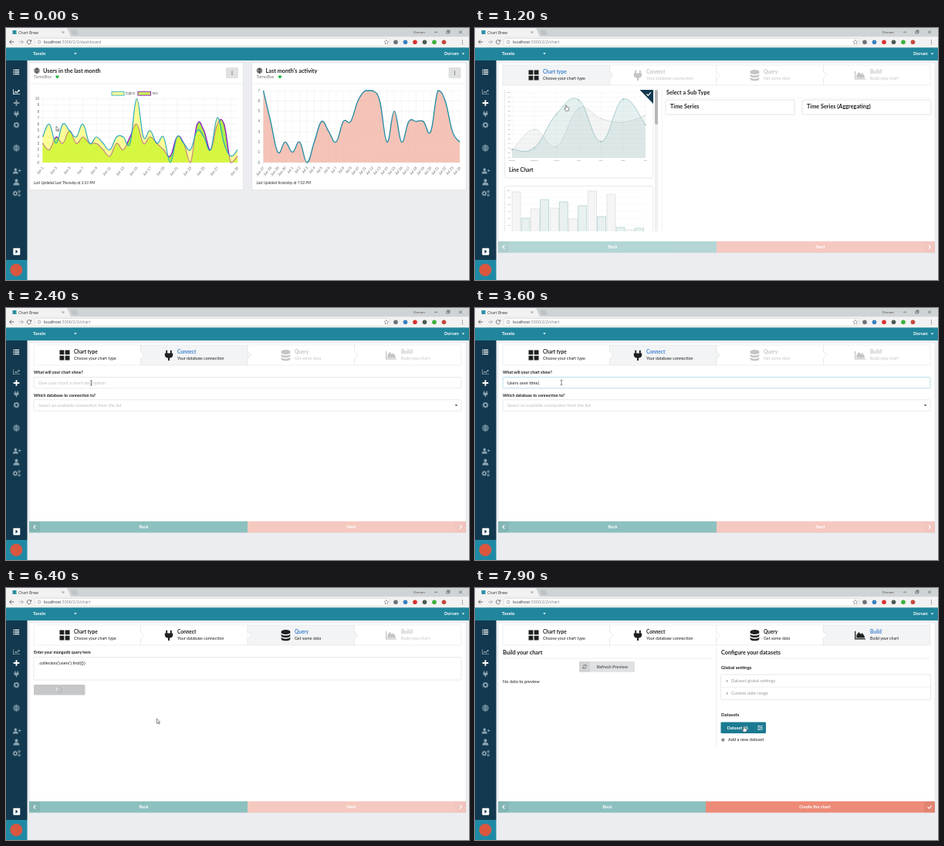
An HTML page that plays this animation: 600 by 326 pixels, repeating every 8000 ms.

```html
<!DOCTYPE html>
<html lang="en">
<head>
<meta charset="utf-8">
<title>Chart Brew</title>
<style>
html, body { margin: 0; width: 100%; height: 100%; overflow: hidden; background: #ebedf0; }
svg { display: block; width: 600px; height: 326px; font-family: Lato, sans-serif; }
</style>
</head>
<body>
<svg id="stage" viewBox="0 0 600 326"></svg>
<script>
const LOOP = 8000, TEAL = '#21869d', NAVY = '#12394f', INK = '#1f2021', SALMON = '#ed8b78';
const USER = 'Dorvan', TEAM = 'Tavelo', SOURCE = 'TarnoBox';

// Drawing helpers
const text = (x, y, size, str, fill = INK, extra = '') =>
  `<text x="${x}" y="${y}" font-size="${size}" fill="${fill}" ${extra}>${str}</text>`;
const bold = (x, y, size, str, fill, extra = '') => text(x, y, size, str, fill, 'font-weight="700" ' + extra);
const MID = 'text-anchor="middle"', END = 'text-anchor="end"';
const rect = (x, y, w, h, fill, extra = '') =>
  `<rect x="${x}" y="${y}" width="${w}" height="${h}" fill="${fill}" ${extra}/>`;
const dot = (x, y, r, fill) => `<circle cx="${x}" cy="${y}" r="${r}" fill="${fill}"/>`;
const fillPath = (d, fill, extra = '') => `<path d="${d}" fill="${fill}" ${extra}/>`;
const line = (d, stroke, width = .5) => `<path d="${d}" fill="none" stroke="${stroke}" stroke-width="${width}"/>`;
const box = (x, y, w, h, stroke = '#d9dadb', fill = '#fff') =>
  rect(x, y, w, h, fill, `rx="1.3" stroke="${stroke}" stroke-width=".6"`);
const range = n => [...Array(n).keys()];
const caret = (x, y, fill) => fillPath(`M${x - 1.8} ${y - 1}h3.6l-1.8 2z`, fill);

// Icons live in a box from -5 to 5
const gearPath = 'M' + range(32).map(i => {
  const a = i * Math.PI / 16, r = i % 4 < 2 ? 5 : 3.7;
  return `${(r * Math.cos(a)).toFixed(2)} ${(r * Math.sin(a)).toFixed(2)}`;
}).join('L') + 'zM-1.8 0a1.8 1.8 0 1 0 3.6 0a1.8 1.8 0 1 0-3.6 0z';
const AXES = 'M-6-4.5h1.1V3.6H6V4.7H-6z';
const icons = {
  grid: 'M-5-5h4.5v4.5h-4.5zM.5-5h4.5v4.5H.5zM-5 .5h4.5V5h-4.5zM.5 .5H5V5H.5z',
  plug: 'M-3-5h1.5v3h-1.5zM1.5-5h1.5v3h-1.5zM-4.2-2h8.4v1.5A4.2 3.6 0 0 1 .8 3V5.5H-.8V3A4.2 3.6 0 0 1-4.2-.5z',
  data: 'M-4.5-3.7A4.5 1.6 0 0 1 4.5-3.7V-2.4A4.5 1.6 0 0 1-4.5-2.4zM-4.5-1.2A4.5 1.6 0 0 0 4.5-1.2V.8A4.5 1.6 0 0 1-4.5 .8zM-4.5 2A4.5 1.6 0 0 0 4.5 2V4A4.5 1.6 0 0 1-4.5 4z',
  area: AXES + 'M-4 3V0L-1.5-3.5 .8-1 2.5-2.5 5 1V3z',
  line: AXES + 'M-4 1.5L-1.2-1.5 1 .5 3.3-2.2 2.3-3.2H5.5V0L4.4-1 1 2.7-1.2 .6-3.2 2.6z',
  plus: 'M-1.1-4.5H1.1V-1.1H4.5V1.1H1.1V4.5H-1.1V1.1H-4.5V-1.1H-1.1z',
  list: [-4, -.8, 2.4].map(y => `M-5 ${y}h1.6v1.6h-1.6zM-2.6 ${y}H5v1.6h-7.6z`).join(''),
  user: 'M-2.4-2.4a2.4 2.6 0 1 1 4.8 0a2.4 2.6 0 1 1-4.8 0zM-4.5 4.6V3A3 2.6 0 0 1-1.5 .7H1.5A3 2.6 0 0 1 4.5 3V4.6z',
  flask: 'M-1.5-4.5H1.5V-1L4 4.5H-4L-1.5-1z',
  gear: gearPath
};
const icon = (name, x, y, s, fill) =>
  fillPath(icons[name], fill, `fill-rule="evenodd" transform="translate(${x} ${y}) scale(${s})"`);
const globe = (x, y, r, c) => `<g transform="translate(${x} ${y}) scale(${r / 4})">` +
  line('M-4 0a4 4 0 1 0 8 0a4 4 0 1 0-8 0M0-4V4M-4 0H4M0-4Q-3.6 0 0 4Q3.6 0 0-4M-3.4-2H3.4M-3.4 2H3.4', c, .75) + '</g>';
const refresh = (x, y, c) => line(`M${x - 2} ${y - .6}a2.1 2.1 0 0 1 3.8-.6m.3-1.4v1.6h-1.6M${x + 2} ${y + .6}a2.1 2.1 0 0 1-3.8 .6m-.3 1.4v-1.6h1.6`, c, .7);

// Smooth curve through points, kept between two heights
function curve(pts, top, bottom) {
  const clamp = y => Math.max(top, Math.min(bottom, y));
  const slope = i => {
    const a = pts[Math.max(i - 1, 0)], b = pts[Math.min(i + 1, pts.length - 1)];
    return [(b[0] - a[0]) * .2, (b[1] - a[1]) * .2];
  };
  return 'M' + pts[0] + pts.slice(1).map((p, i) => {
    const q = pts[i], s = slope(i), e = slope(i + 1);
    return `C${q[0] + s[0]} ${clamp(q[1] + s[1])} ${p[0] - e[0]} ${clamp(p[1] - e[1])} ${p}`;
  }).join('');
}
const under = (pts, top, bottom) => curve(pts, top, bottom) + `V${bottom}H${pts[0][0]}z`;

// Browser window
function browser() {
  let s = rect(0, 0, 600, 12, '#d0d3d5') + fillPath('M0 0H79L84 11.5H0z', '#f2f2f2') +
    fillPath('M83.5 2.5h8l2.5 6.5h-8z', '#bfc3c5') + rect(0, 11.3, 600, 14, '#f2f2f2') +
    rect(8.5, 3, 5, 5, '#2a8fa3') + text(16, 7.8, 5, 'Chart Brew', '#333', 'font-family="Open Sans, sans-serif"') +
    line('M72.5 4l3 3m0-3l-3 3', '#555') + text(528, 7, 4.6, USER, '#555') +
    line('M555 5.3h4M571 4h3v3h-3zm1 0v-1h3v3h-1M587 3.3l4 4m0-4l-4 4', '#222') +
    line('M10 18H4.6m2.4-2.5L4.5 18l2.5 2.5', '#555', .9) + line('M17 18h5.4m-2.4-2.5l2.5 2.5-2.5 2.5', '#aaa', .9) +
    line('M32.3 17a2.6 2.6 0 1 0 0 2.2m.3-3.8v1.9h-1.9', '#555', .8) +
    rect(37.5, 13.4, 460, 9.8, '#fff', 'rx="1.2" stroke="#c4c4c4" stroke-width=".5"') +
    line('M40.9 18.2a2.1 2.1 0 1 0 4.2 0a2.1 2.1 0 1 0-4.2 0M43 17.8v1.6M43 16.8v.5', '#777', .5) +
    text(49, 20.3, 5.3, 'localhost<tspan id="path" fill="#777"></tspan>', '#222', 'font-family="Open Sans, sans-serif"') +
    fillPath('M493 15l.9 2.2 2.3.1-1.8 1.5.6 2.3-2-1.3-2 1.3.6-2.3-1.8-1.5 2.3-.1z', 'none', 'stroke="#666" stroke-width=".5"');
  ['#6b7176', '#3b7fc0', '#d8322f', '#4b5a51', '#3fae3e', '#c5483a'].forEach((c, i) => s += dot(505 + 12.5 * i, 18.3, 2.8, c));
  return s + [16, 18.3, 20.6].map(y => dot(591.5, y, .6, '#555')).join('');
}

function frame() {
  const dim = '#8aa3b1';
  return rect(0, 25, 600, 17, TEAL) + rect(0, 42, 27.5, 258, NAVY) + rect(0, 300, 27.5, 26, '#208aa5') +
    bold(35, 35.2, 5.7, TEAM, '#fff') + caret(90, 33.2, '#fff') + bold(568, 35.2, 5.7, USER, '#fff') + caret(592.5, 33.5, '#fff') +
    icon('list', 13.2, 57, .8, '#fff') + `<g id="navLine">${icon('line', 13.5, 82.5, .75, '#fff')}</g>` +
    `<g id="navPlus">${icon('plus', 13.5, 97, .85, '#fff')}</g>` + icon('plug', 13.5, 111, .75, dim) +
    icon('gear', 13.5, 125.5, .82, dim) + globe(13.5, 155.3, 3.9, dim) + icon('user', 12.3, 185, .75, dim) +
    icon('plus', 17.6, 184.5, .4, dim) + icon('user', 13.5, 199.5, .85, dim) + icon('gear', 12, 214, .7, dim) +
    icon('gear', 17.2, 211.6, .36, dim) + icon('gear', 17.2, 216.2, .36, dim) +
    rect(9.3, 284.8, 9, 9, '#fff', 'rx="1"') + fillPath('M12.5 286.8l3 2.5-3 2.5z', NAVY) + dot(13.3, 313, 8, '#d9563f');
}

// Dashboard
function dashboard() {
  const label = { size: 4.7, font: 'font-family="Liberation Sans, Arial, sans-serif"' };
  const small = (x, y, str, extra) => text(x, y, label.size, str, '#666', label.font + ' ' + extra);
  const card = (x, title, foot) => rect(x, 44.5, 277.5, 165, '#fff', 'stroke="#d8dadd" stroke-width=".6"') +
    line(`M${x} 72h277.5`, '#dfe1e3') + globe(x + 10, 55.2, 3.3, INK) + bold(x + 18, 58, 7.3, title) +
    text(x + 6, 65, 5.6, SOURCE, '#777') + fillPath(`M${x + 34.5} 61.5h4v1.8l-2 2.2-2-2.2z`, '#21ba45') +
    rect(x + 255, 51, 16, 14, '#e0e1e2', 'rx="1.3"') + [-2.2, 0, 2.2].map(d => dot(x + 263, 58 + d, .65, '#555')).join('') +
    text(x + 6, 202, 4.8, foot, '#333', 'font-style="italic"');
  const axes = (x0, x1, top, max, labels, skip) => {
    const dx = (x1 - x0) / (labels.length - 1), unit = (174 - top) / max;
    return range(max + 1).map(v => line(`M${x0 - 3} ${174 - v * unit}H${x1}`, '#e4e4e4', .4) +
      small(x0 - 4.5, 175.6 - v * unit, v, END)).join('') +
      labels.map((l, i) => i % skip ? '' : line(`M${x0 + i * dx} ${top}V177`, '#e9e9e9', .4) +
        small(0, 0, l, END + ` transform="translate(${x0 + i * dx + 1.5} 181) rotate(-50)"`)).join('');
  };
  const points = (vals, x0, x1, top, max) =>
    vals.map((v, i) => [x0 + i * (x1 - x0) / (vals.length - 1), 174 - v * (174 - top) / max]);
  const logins = points([4,6,3,6,5,4,6,3,4,3,2,4,4,3,10,4,5,3,4,0,4,3,2,5,4,2,7,3,1,2], 47.5, 300, 91.5, 10);
  const second = points([3,2,4,3,5,3,4,3,3,2,1,3,2,4,6,3,4,3,2,1,4,3,0,6,5,2,6,6,0,1], 47.5, 300, 91.5, 10);
  const activity = points([7,4,1,2,1,2,0,2,4,3,2,4,4,6,7,7,6,2,5,2,4,4,4,3,7,6,3,2], 333.5, 588, 81, 7);
  const june = range(30).map(i => 'Jun ' + (i + 1)), july = range(28).map(i => i < 4 ? 'Jun ' + (27 + i) : 'Jul ' + (i - 3));
  june[28] = ''; 
  return card(30, 'Users in the last month', 'Last Updated Last Thursday at 2:01 PM') +
    card(318.5, 'Last month\'s activity', 'Last Updated Yesterday at 7:02 PM') +
    axes(47.5, 300, 91.5, 10, june, 2) + small(301.5, 181, 'Jun 30', END + ' transform="rotate(-50 301.5 181)"') +
    rect(137, 82.3, 16, 4.8, '#fbfb9a', `stroke="#2cb0c0" stroke-width=".9"`) + small(155, 86.4, 'logins') +
    rect(171, 82.3, 16.5, 4.8, '#c9f25e', 'stroke="#8a12b4" stroke-width=".9"') + small(189.5, 86.4, 'two') +
    fillPath(under(second, 91.5, 174), '#a8f04a') + line(curve(second, 91.5, 174), '#8a00c4', 1.2) +
    fillPath(under(logins, 91.5, 174), '#ffff3c', 'opacity=".52"') + line(curve(logins, 91.5, 174), '#2ba9bd', 1.2) +
    axes(333.5, 588, 81, 7, july, 1) + fillPath(under(activity, 81, 174), '#f3b5a6', 'opacity=".8"') +
    line(curve(activity, 81, 174), '#1f8aa3', 1.3);
}

// Wizard
const stepInfo = [
  ['Chart type', 'Choose your chart type', 'grid', 76, 88, 1.3],
  ['Connect', 'Your database connection', 'plug', 211, 222, 1.25],
  ['Query', 'Get some data', 'data', 362.5, 374, 1.3],
  ['Build', 'Build your chart', 'area', 499, 512, 1.15]
];
function wizard(active, body) {
  const split = active == 3 ? 299 : 313, bg = i => i == active ? '#f3f4f5' : '#fff', w = 138.5;
  const boxes = range(4).map(i => rect(36 + i * w, 48, w, 26, bg(i), 'stroke="#dddee0" stroke-width=".5"')).join('');
  const heads = stepInfo.map(([title, note, name, ix, tx, s], i) => {
    const c = i > active ? '#c3c4c6' : INK, xe = 36 + (i + 1) * w;
    return (i < 3 ? fillPath(`M${xe - .3} 56l5 5-5 5`, bg(i), 'stroke="#d5d6d8" stroke-width=".5"') : '') +
      icon(name, ix, 61, s, c) + bold(tx, 59.2, 6.5, title, i == active ? '#3f82d0' : c) + text(tx, 66.5, 5.35, note, c);
  }).join('');
  const back = rect(30, 276, split - 30, 14.6, '#8cc1bf') + rect(30, 276, 14, 14.6, '#000', 'opacity=".06"') +
    line('M38.3 281l-2.3 2.3 2.3 2.3', '#fff', 1.1) + bold((split + 44) / 2, 285.2, 5.6, 'Back', '#fff', MID);
  const next = rect(split, 276, 596 - split, 14.6, SALMON) + rect(582, 276, 14, 14.6, '#000', 'opacity=".05"') +
    line(active == 3 ? 'M586.7 283.4l1.7 1.7 3.3-3.6' : 'M588 281l2.3 2.3-2.3 2.3', '#fff', 1.1) +
    bold(active == 3 ? 440.5 : 447.5, 285.2, 5.6, active == 3 ? 'Create the chart' : 'Next', '#fff', MID);
  return rect(30, 44.5, 566, 246, '#fff', 'stroke="#e0e2e4" stroke-width=".5"') + boxes + heads + body +
    `<g opacity="${active ? 1 : .65}">${back}</g><g class="next">${next}</g>`;
}

function chartTypes() {
  const tiny = (x, y, str, extra) => text(x, y, 2.6, str, '#777', extra);
  const spread = ys => ys.map((y, i) => [48 + i * 28.8, y]);
  const teal = spread([157, 155, 111, 93, 147, 92, 125]), gray = spread([158, 131, 153, 104, 117, 122, 113]);
  const plot = (pts, c, o) => fillPath(under(pts, 83, 168), c, `opacity="${o}"`) + line(curve(pts, 83, 168), c, .6) +
    pts.map(p => dot(p[0], p[1], .8, c)).join('');
  const months = ['January', 'February', 'March', 'April', 'May', 'June', 'July'];
  const lineCard = box(38.5, 79, 192.5, 115) +
    range(15).map(i => line(`M46 ${83.5 + i * 6}H221`, '#eee', .4) + tiny(45.5, 84.4 + i * 6, 100 - i * 5, END)).join('') +
    months.map((m, i) => line(`M${48 + i * 28.8} 83V169`, '#eee', .4) + tiny(48 + i * 28.8, 172, m, MID)).join('') +
    plot(gray, '#cfd1d2', .25) + plot(teal, '#7fb3b3', .2) + bold(44, 186, 6.9, 'Line Chart') +
    `<g class="picked">${fillPath('M213 79.5H231V98z', NAVY)}${line('M222.3 85.3l2 2 3.6-4', '#fff', 1.2)}</g>`;
  const grayTops = [212, 234, 233, 247, 211, 215, 261], tealTops = [246, 222, 225, 230, 244, 258, 259];
  const bars = (tops, x0, fill, stroke) => tops.map((y, i) =>
    rect(x0 + i * 24.6, y, 11, 290 - y, fill, `stroke="${stroke}" stroke-width=".6"`)).join('');
  const barCard = box(38.5, 204.5, 192.5, 90) +
    range(7).map(i => line(`M46 ${210 + i * 9}H221`, '#eee', .4) + tiny(45.5, 211 + i * 9, 100 - i * 10, END)).join('') +
    bars(grayTops, 48, '#f5f5f5', '#d6d8d8') + bars(tealTops, 60, '#e8f0f0', '#9cc8c6');
  const sub = (x, title, id) => `<rect id="${id}" x="${x}" y="93" width="167" height="19" rx="1.5" fill="#fff" stroke="#d6d8da" stroke-width=".7"/>` +
    bold(x + 6, 104.3, 7.3, title);
  return '<clipPath id="list"><rect x="37" y="80" width="202" height="183"/></clipPath>' +
    `<g clip-path="url(#list)">${lineCard + barCard}${rect(233, 80, 4, 183, '#f0f0f0') + rect(233, 80, 4, 45, '#b4b6b8', 'rx="2"')}</g>` +
    line('M242.5 78V263', '#e6e7e8') + `<g class="picked">${bold(248, 86.2, 7.3, 'Select a Sub Type') + line('M248 90.3H591', '#eceded') +
    sub(247, 'Time Series', 'series') + sub(424, 'Time Series (Aggregating)', 'aggregate')}</g>`;
}

const connectBody = bold(36, 85.2, 5.3, 'What will your chart show?') +
  '<rect id="field" x="36" y="89.5" width="554" height="14.3" rx="1.3" fill="#fff" stroke-width=".6"/>' +
  '<text id="name" x="42" y="98.6" font-size="5.75"></text>' +
  bold(36, 115.2, 5.3, 'Which database to connection to?') + box(36, 118.7, 554, 14.3) +
  '<text id="choice" x="42" y="127.8" font-size="5.75"></text>' + caret(583.5, 126, '#444') +
  `<g id="menu">${box(36, 133, 554, 14.5, '#96c8da') + text(42, 142.2, 5.75, SOURCE)}</g>`;

const queryBody = bold(36, 85.2, 5.25, 'Enter your mongodb query here') + box(36, 89.5, 554, 29.5) +
  '<text id="query" x="42" y="98.8" font-size="5.45" fill="#222" font-family="Liberation Sans, Arial, sans-serif"></text>' +
  `<g id="test">${rect(36, 125, 66.5, 13.5, '#d5d6d7', 'rx="1.3"') + rect(89, 125, 13.5, 13.5, '#c4c5c7', 'rx="1.3"') +
    bold(44, 133.6, 5.6, 'Test the query', '#5c5d5e') + icon('flask', 95.7, 131.7, .5, '#444')}</g>` +
  `<g id="busy">${rect(36, 125, 66.5, 13.5, '#c6c7c8', 'rx="1.3"') + line('M65.7 131.7a3.5 3.5 0 1 0 7 0a3.5 3.5 0 1 0-7 0', '#b2b3b4', .9)}` +
  `<path id="spin" d="M69.2 128.2a3.5 3.5 0 0 1 3.5 3.5" fill="none" stroke="#fff" stroke-width=".9"/></g>`;

const buildBody = bold(36, 86.2, 7.3, 'Build your chart') + line('M36 91H307M319 91H590M313 77V205', '#dcdddf') +
  rect(135, 95, 72, 13.7, '#e0e1e2', 'rx="1.3"') + rect(135, 95, 14, 13.7, '#d2d3d4', 'rx="1.3"') +
  refresh(142, 101.8, '#555') + bold(178, 103.7, 5.6, 'Refresh Preview', '#5c5d5e', MID) +
  text(36, 122.6, 5.7, 'No data to preview') + bold(319, 86.2, 7.3, 'Configure your datasets') +
  bold(319, 105, 6, 'Global settings') + box(318.5, 112, 272, 32.5) + line('M318.5 128.2H590.5', '#dcdddf') +
  ['Dataset global settings', 'Custom date range'].map((s, i) =>
    fillPath(`M326 ${118.7 + i * 16}l2 1.6-2 1.6z`, '#999') + text(332, 122.2 + i * 16, 5.75, s, '#999')).join('') +
  bold(319, 166, 6, 'Datasets') + rect(318.5, 173.5, 58.5, 14.5, '#1b7a92', 'rx="1.3"') +
  bold(340.5, 182.7, 5.7, 'Dataset #1', '#fff', MID) + line('M366 178.6h7M366 180.8h7M366 183h7M368 177.8v1.6M371 180v1.6M368 182.2v1.6', '#fff', .7) +
  icon('plus', 321.3, 196.5, .55, '#666') + text(328, 198.4, 5.7, 'Add a new dataset');

const bodies = [dashboard(), wizard(0, chartTypes()), wizard(1, connectBody), wizard(2, queryBody), wizard(3, buildBody)];
const $ = id => document.getElementById(id);
$('stage').innerHTML = rect(0, 0, 600, 326, '#ebedf0') + bodies.map(b => `<g class="page">${b}</g>`).join('') + frame() + browser() +
  '<g id="cursor">' +
  fillPath('M0 0V6.2L1.4 4.9 2.4 7.1 3.3 6.7 2.3 4.6H4.2z', '#fff', 'stroke="#222" stroke-width=".5"') +
  fillPath('M-.7 3.8V.2Q0-.8 .7 .2V2.4L3.4 3Q4 3.3 3.8 4.4L3.2 7.2H-.6L-2.2 4.6Q-2.3 3.6-.7 4.4z', '#fff', 'stroke="#222" stroke-width=".5"') +
  line('M-1.3-3H1.3M-1.3 3H1.3M0-3V3', '#333', .6) + '</g>';

// Timeline
const ARROW = 0, HAND = 1, BEAM = 2;
const pageStarts = [0, 800, 2100, 4400, 7000], nextFrom = [0, 1650, 4100, 6650, 0];
const moves = [
  [0, 65, 127, ARROW], [200, 65, 127, ARROW], [600, 14, 97, HAND], [800, 14, 97, HAND], [1100, 118, 100, HAND],
  [1270, 118, 100, HAND], [1580, 330, 103, HAND], [1680, 330, 103, HAND], [1900, 448, 283, HAND], [2100, 448, 283, HAND],
  [2350, 110.5, 97, BEAM], [2900, 110.5, 97, BEAM], [3100, 112, 96.3, BEAM], [3650, 112, 96.3, BEAM], [3800, 200, 126, HAND],
  [3900, 200, 126, HAND], [4020, 100, 141, HAND], [4100, 100, 141, HAND], [4300, 448, 283, HAND], [4400, 448, 283, HAND],
  [4650, 127, 104, BEAM], [5600, 127, 104, BEAM], [5900, 62, 131, HAND], [6050, 62, 131, HAND], [6350, 195.5, 169, ARROW],
  [6550, 195.5, 169, ARROW], [6850, 448, 283, HAND], [7000, 448, 283, HAND], [7500, 348.5, 179, HAND], [LOOP, 348.5, 179, HAND]
];
const show = (el, on) => el.style.display = on ? '' : 'none';
const typed = (str, t, from, to) => str.slice(0, Math.round(str.length * Math.max(0, Math.min(1, (t - from) / (to - from)))));
const pages = [...document.querySelectorAll('.page')], picked = document.querySelectorAll('.picked');

function render(t) {
  const current = pageStarts.filter(s => s <= t).length - 1;
  pages.forEach((p, i) => {
    show(p, i == current);
    p.querySelector('.next')?.setAttribute('opacity', t >= nextFrom[i] ? 1 : .46);
  });
  $('path').textContent = ':3000/2/2/' + (current ? 'chart' : 'dashboard');
  $('navLine').setAttribute('opacity', current ? .5 : 1);
  $('navPlus').setAttribute('opacity', current ? 1 : .5);
  picked.forEach(el => show(el, t >= 1120));
  $('series').setAttribute('stroke', t >= 1650 ? TEAL : '#d6d8da');

  const name = typed('Users over time', t, 3050, 3550), focused = t >= 2900 && t < 3800;
  $('name').textContent = name ? name + (focused ? '|' : '') : 'Give your chart a short description';
  $('name').setAttribute('fill', name ? INK : '#bcbdbe');
  $('field').setAttribute('stroke', focused ? '#8cc6d6' : '#d9dadb');
  show($('menu'), t >= 3850 && t < 4100);
  $('choice').textContent = t >= 4100 ? SOURCE : 'Select an available connection from the list';
  $('choice').setAttribute('fill', t >= 4100 ? INK : '#bcbdbe');

  $('query').textContent = typed(".collection('users')", t, 4500, 4850) + typed('.find({})', t, 5000, 5500);
  const busy = t >= 6000 && t < 6650;
  show($('test'), !busy);
  show($('busy'), busy);
  $('spin').setAttribute('transform', `rotate(${t * .6 % 360} 69.2 131.7)`);

  const k = moves.findIndex(m => m[0] > t), [t0, x0, y0, s0] = moves[k - 1], [t1, x1, y1, s1] = moves[k];
  const u = (t - t0) / (t1 - t0), e = u * u * (3 - 2 * u), shape = u < .5 ? s0 : s1;
  $('cursor').setAttribute('transform', `translate(${x0 + (x1 - x0) * e} ${y0 + (y1 - y0) * e})`);
  [...$('cursor').children].forEach((c, i) => show(c, i == shape));
}
function tick() {
  render(performance.now() % LOOP);
  requestAnimationFrame(tick);
}
tick();
</script>
</body>
</html>
```
